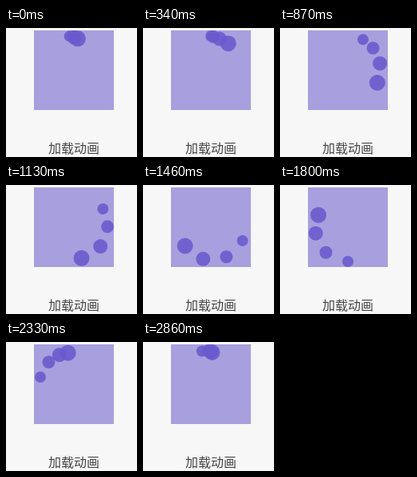
Write an HTML page with a canvas that moves like this. It is 164 px wide and 162 px high and loops after 2930 ms.

```html
<!DOCTYPE html>
<html lang="zh-CN">
<head>
<meta charset="utf-8">
<title>加载动画</title>
<style>
  html, body { margin: 0; width: 100%; height: 100%; overflow: hidden; background: #f7f7f7; }
  canvas, svg { position: absolute; left: 0; top: 0; width: 164px; height: 162px; }
  text { font: 16px "Noto Sans CJK SC", "Noto Sans CJK", sans-serif; fill: #444; }
</style>
</head>
<body>
<canvas id="stage"></canvas>
<svg viewBox="0 0 164 162"><text x="53" y="157">加载动画</text></svg>
<script>
const LOOP = 2930, FRAMES = 44, FPS = 15, PERIOD = 3000;
const BOX = { x: 35, y: 3, size: 100 };
const RADII = [10, 9, 8, 7];

const canvas = document.getElementById('stage');
const ctx = canvas.getContext('2d');
const dpr = window.devicePixelRatio || 1;
canvas.width = 164 * dpr;
canvas.height = 162 * dpr;
ctx.scale(dpr, dpr);

// cubic-bezier(.42, 0, .58, 1), solved by bisection
function easeInOut(x) {
  let lo = 0, hi = 1, s = 0.5;
  for (let i = 0; i < 24; i++) {
    s = (lo + hi) / 2;
    const bx = 1.26 * s * (1 - s) ** 2 + 1.74 * s * s * (1 - s) + s ** 3;
    if (bx < x) lo = s; else hi = s;
  }
  return s * s * (3 - 2 * s);
}

function draw(time) {
  ctx.clearRect(0, 0, 164, 162);
  ctx.fillStyle = '#a89fde';
  ctx.fillRect(BOX.x, BOX.y, BOX.size, BOX.size);

  const half = BOX.size / 2;
  ctx.fillStyle = 'rgba(106, 90, 205, 0.9)';
  RADII.forEach((r, i) => {
    // each smaller dot trails the one before it by 200 ms
    const phase = ((time + 300 - i * 200 + PERIOD) % PERIOD) / PERIOD;
    const angle = easeInOut(phase) * Math.PI * 2;
    const orbit = half - r;
    ctx.beginPath();
    ctx.arc(BOX.x + half + orbit * Math.sin(angle),
            BOX.y + half - orbit * Math.cos(angle), r, 0, Math.PI * 2);
    ctx.fill();
  });
}

// the motion advances at 15 pictures per second
function tick() {
  const t = performance.now() % LOOP;
  const step = Math.min(FRAMES - 1, Math.floor((t + 8) * FRAMES / LOOP));
  draw(step * 1000 / FPS);
  requestAnimationFrame(tick);
}
tick();
</script>
</body>
</html>
```
